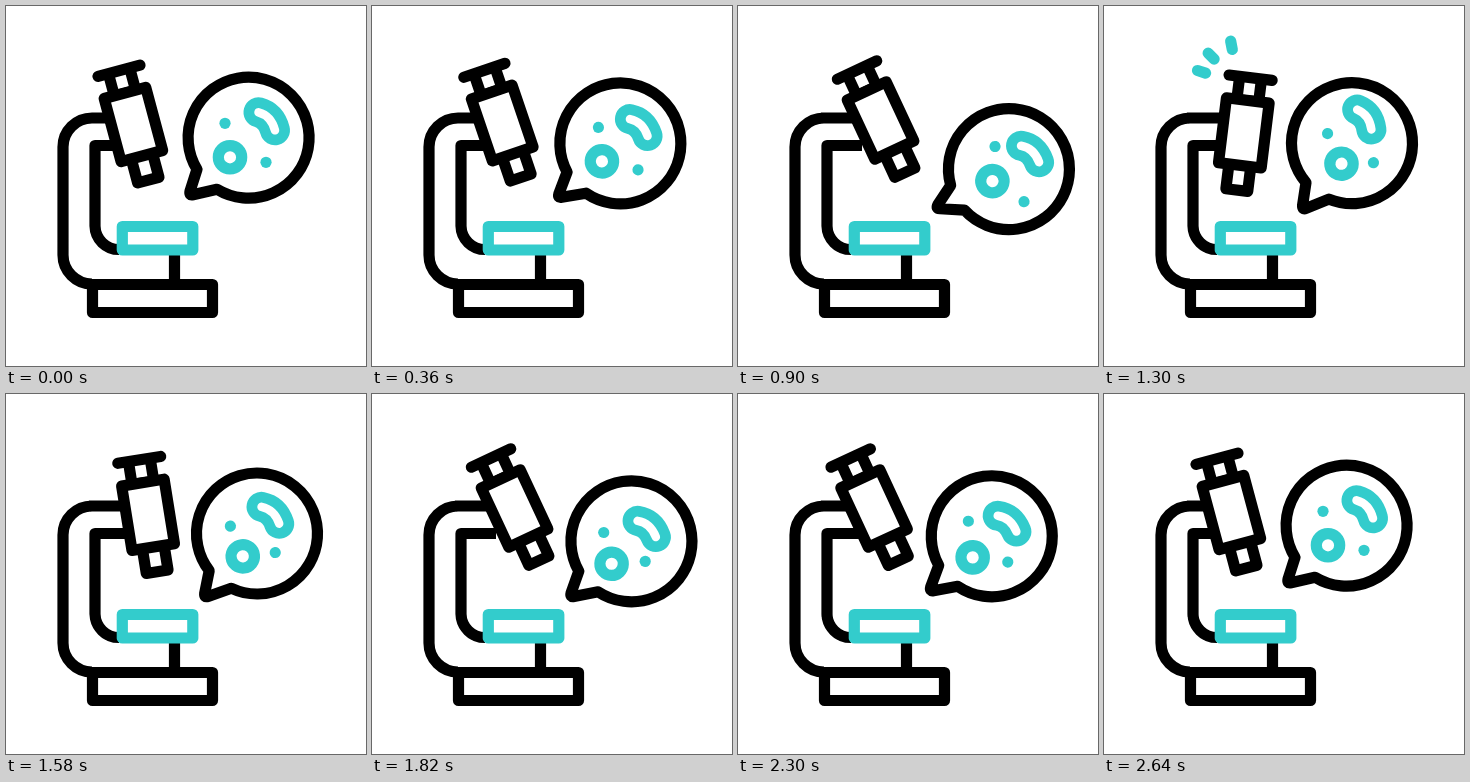
Animation, 360 px wide and 360 px high, one loop 3 s. Source, as an HTML page:

```html
<!DOCTYPE html>
<html lang="en">
<head>
<meta charset="utf-8">
<title>Microscope</title>
<style>
  html, body { margin: 0; width: 100%; height: 100%; overflow: hidden; background: #fff; }
  svg { display: block; width: 100%; height: 100%; }
  .ink, .teal { fill: none; stroke: #000; stroke-width: 11.2; stroke-linejoin: round; }
  .teal { stroke: #33cccc; }
  .solid { fill: #fff; }
  .dot { fill: #33cccc; }
  .round { stroke-linecap: round; }
</style>
</head>
<body>
<svg viewBox="0 0 360 360">
  <g class="ink">
    <path d="M120 112H86A29 29 0 0 0 57 141V249A29 29 0 0 0 86 278M124 139.500H89V220A24 24 0 0 0 113 243.500M168.500 246V276"/>
    <rect x="86.500" y="278.500" width="120" height="28"/>
  </g>
  <rect class="teal" x="116.300" y="220.500" width="70.500" height="23.500"/>

  <!-- eyepiece tube, drawn around its pivot -->
  <g id="tube" class="ink">
    <g transform="translate(21.500 0)">
      <path class="solid" d="M-11 -47.300V-24H11V-47.300M-11 41V65.900H11V41"/>
      <path class="solid" d="M-21.500 -24.300H21.500V41H-21.500Z"/>
      <path class="round" d="M-21.700 -47.300H21.700"/>
    </g>
  </g>
  <g id="rays" class="teal round"></g>

  <!-- speech bubble, drawn around the tip of its tail -->
  <g id="bubble">
    <path class="ink solid" d="M5 -25L-2 -3Q-3 1.500 1 0.500L25 -5A60.500 60.500 0 1 0 5 -25Z"/>
    <g transform="translate(57 -56)">
      <circle class="cell dot" r="5.600"/>
      <circle class="cell dot" r="5.600"/>
      <circle class="cell teal" r="11.700"/>
      <g class="cell round" fill="none">
        <path d="M-8.500 -9Q4.200 -5.500 8 9" stroke="#33cccc" stroke-width="30"/>
        <path d="M-8.500 -9Q4.200 -5.500 8 9" stroke="#fff" stroke-width="8.500"/>
      </g>
    </g>
  </g>
</svg>
<script>
const LOOP = 3000;
const $ = id => document.getElementById(id);
const smooth = u => u * u * (3 - 2 * u);
const mix = (a, b, u) => a + (b - a) * u;
const ramp = (t, from, to) => smooth(Math.min(1, Math.max(0, (t - from) / (to - from))));

// Eased value of a list of [time, value] keys.
function track(t, keys) {
  let value = keys[0][1];
  for (let i = 1; i < keys.length; i++) {
    value = mix(value, keys[i][1], ramp(t, keys[i - 1][0], keys[i][0]));
  }
  return value;
}

const TUBE_ANGLE = [[220, -15], [560, -25], [900, -25], [1300, 7], [1360, 7],
                    [1800, -25], [2280, -25], [2600, -15]];
const BUBBLE_ANGLE = [[220, 0], [730, 17], [840, 17], [1340, -9.5], [1400, -9.5],
                      [2000, 5], [2640, 0]];

// Cells drift inside the bubble: home position, then offsets at the drift times.
const DRIFT_TIMES = [220, 580, 900, 1300, 1820, 2300, 2640];
const drift = values => [0, ...values, 0].map((v, i) => [DRIFT_TIMES[i], v]);
const CELLS = [
  { x: -24, y: -15, dx: [2.4, 4, 1, -4.4, -0.5], dy: [-1, -3.5, 1, 6.5, 0.5] },
  { x: 17, y: 24, dx: [5, 6, 0.7, -3, -0.2], dy: [2.4, 2.6, -2, -5, 0.4] },
  { x: -19, y: 19, dx: [3.5, 6, 5, -0.5, 0.5], dy: [-2, -3.5, -1, 3.5, 2.4] },
  { x: 18, y: -17, dx: [-2, -2, -2.3, -3.3, -3.5], dy: [-1.4, -4, -5, 3.5, 3],
    turn: [-20, -21, 16, -8, -10] }
].map(c => ({ ...c, dx: drift(c.dx), dy: drift(c.dy), turn: drift(c.turn || [0, 0, 0, 0, 0]) }));
const cellNodes = document.querySelectorAll('.cell');

const rays = [198, 225, 259].map(angle => {
  const line = document.createElementNS('http://www.w3.org/2000/svg', 'line');
  line.setAttribute('transform', `translate(135 78) rotate(${angle})`);
  return $('rays').appendChild(line);
});

function place(node, x, y, angle) {
  node.setAttribute('transform', `translate(${x} ${y}) rotate(${angle})`);
}

function draw(t) {
  const out = ramp(t, 220, 740) - ramp(t, 2020, 2640);
  place($('tube'), mix(104.5, 119.5, out), 116, track(t, TUBE_ANGLE));
  place($('bubble'), mix(186, 201, out), mix(188.3, 202, out), track(t, BUBBLE_ANGLE));

  CELLS.forEach((c, i) =>
    place(cellNodes[i], c.x + track(t, c.dx), c.y + track(t, c.dy), track(t, c.turn)));

  const head = mix(30, 57, ramp(t, 1140, 1460));
  const tail = mix(30, 57, ramp(t, 1200, 1560));
  $('rays').style.display = head - tail > 0.1 ? '' : 'none';
  for (const ray of rays) {
    ray.setAttribute('x1', tail);
    ray.setAttribute('x2', head);
  }
}

const start = performance.now();
function tick() {
  draw((performance.now() - start) % LOOP);
  requestAnimationFrame(tick);
}
tick();
</script>
</body>
</html>
```
